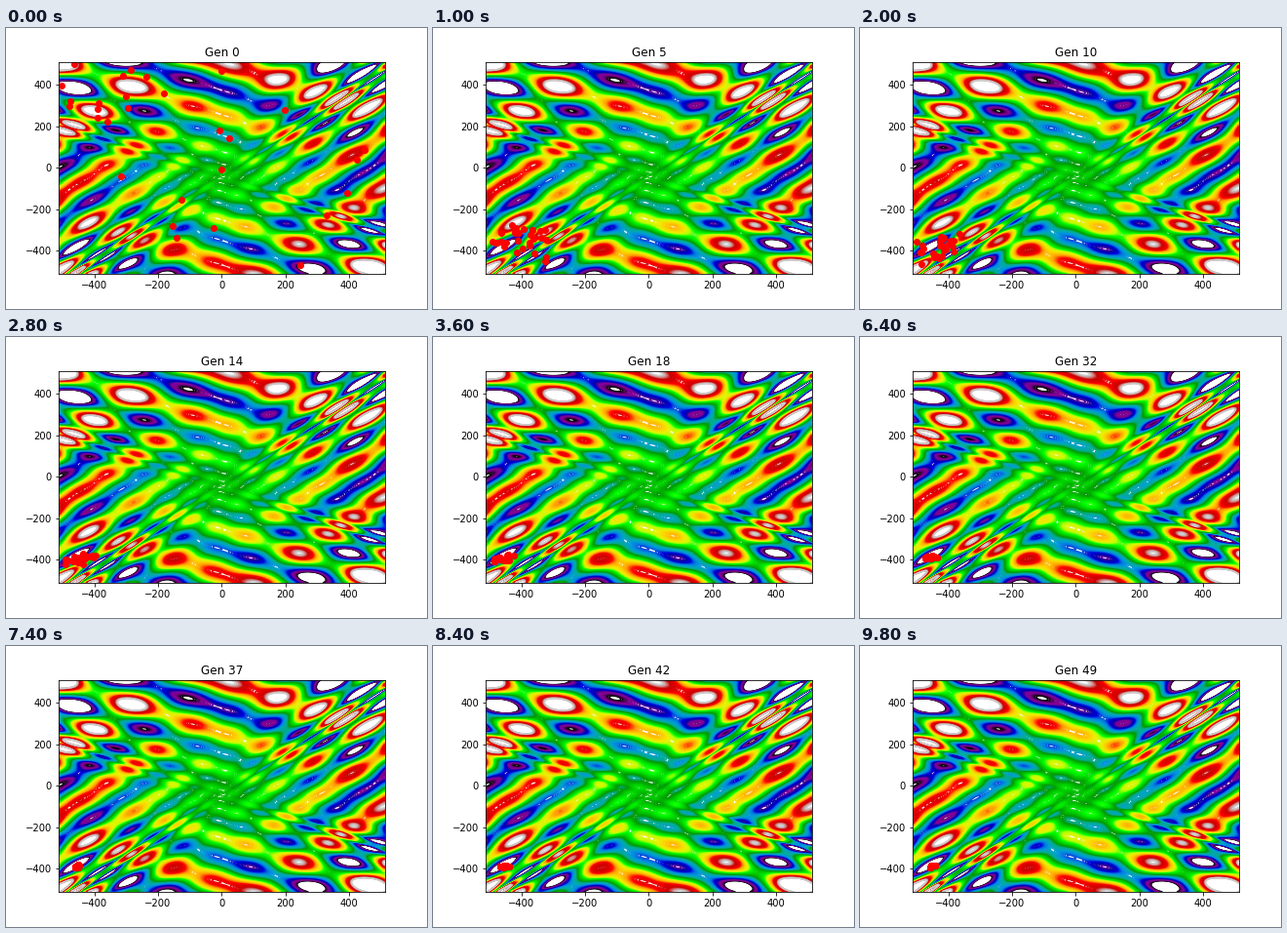
Animation of 432 by 288 pixels, one loop 10000 ms. Source, as a matplotlib script:

```python
import numpy as np
import matplotlib.pyplot as plt
from matplotlib.animation import FuncAnimation

GENS = 50
SIZE = 29
BOUND = 512
BEST = np.array([-453, -388])


def eggholder(x, y):
    u = y + 47
    return (-u * np.sin(np.sqrt(np.abs(x / 2 + u)))
            - x * np.sin(np.sqrt(np.abs(x - u))))


def first_population():
    """A dense group at the upper left, the rest anywhere."""
    rng = np.random.default_rng(4)
    group = rng.normal((-330, 300), (90, 90), (12, 2))
    rest = rng.uniform(-BOUND, BOUND, (SIZE - 12, 2))
    return np.vstack([group, rest])


def offsets(gen):
    """Kept offsets, with some individuals redrawn in each generation."""
    kept = np.random.default_rng(7).normal(size=(SIZE, 2))
    rng = np.random.default_rng(100 + gen)
    fresh = rng.normal(size=(SIZE, 2))
    mutated = rng.random((SIZE, 1)) < 0.3
    unique = max(6, round(SIZE - 0.55 * gen))
    z = np.where(mutated, fresh, kept)[np.arange(SIZE) % unique]
    return np.clip(z, -1.8, 1.8)


def population(gen):
    if gen == 0:
        return START
    late = max(gen - 10, 0)
    fade = np.exp(-late / 8)
    spread = np.array([10 + 35 * fade, 5 + 38 * np.exp(-late / 5)])
    cluster = BEST + np.array([28, -8]) * fade + spread * offsets(gen)
    pull = 1 - np.exp(-gen / 2.2)
    return np.clip(START + (cluster - START) * pull, -BOUND, BOUND)


START = first_population()

fig, ax = plt.subplots(figsize=(6, 4), dpi=72)
fig.subplots_adjust(left=0.125, right=0.9, bottom=0.125, top=0.88)

# The landscape never changes, so it is rendered once and reused.
axis = np.arange(-BOUND, BOUND + 1, 2)
X, Y = np.meshgrid(axis, axis)
lines = ax.contour(X, Y, eggholder(X, Y), np.arange(-550, 551, 10),
                   cmap="nipy_spectral", linewidths=1.5)
ax.set(xlim=(-BOUND, BOUND), ylim=(-BOUND, BOUND))
ax.set_axis_off()
fig.canvas.draw()
landscape = np.asarray(fig.canvas.buffer_rgba()).copy()
lines.remove()
fig.figimage(landscape, zorder=-1)
ax.set_axis_on()
ax.patch.set_visible(False)

dots, = ax.plot([], [], "ro", markersize=6)
title = ax.set_title("Gen 0")


def update(gen):
    dots.set_data(*population(gen).T)
    title.set_text(f"Gen {gen}")
    return dots, title


anim = FuncAnimation(fig, update, frames=GENS, interval=200,
                     repeat=True, repeat_delay=0)
plt.show()
```
